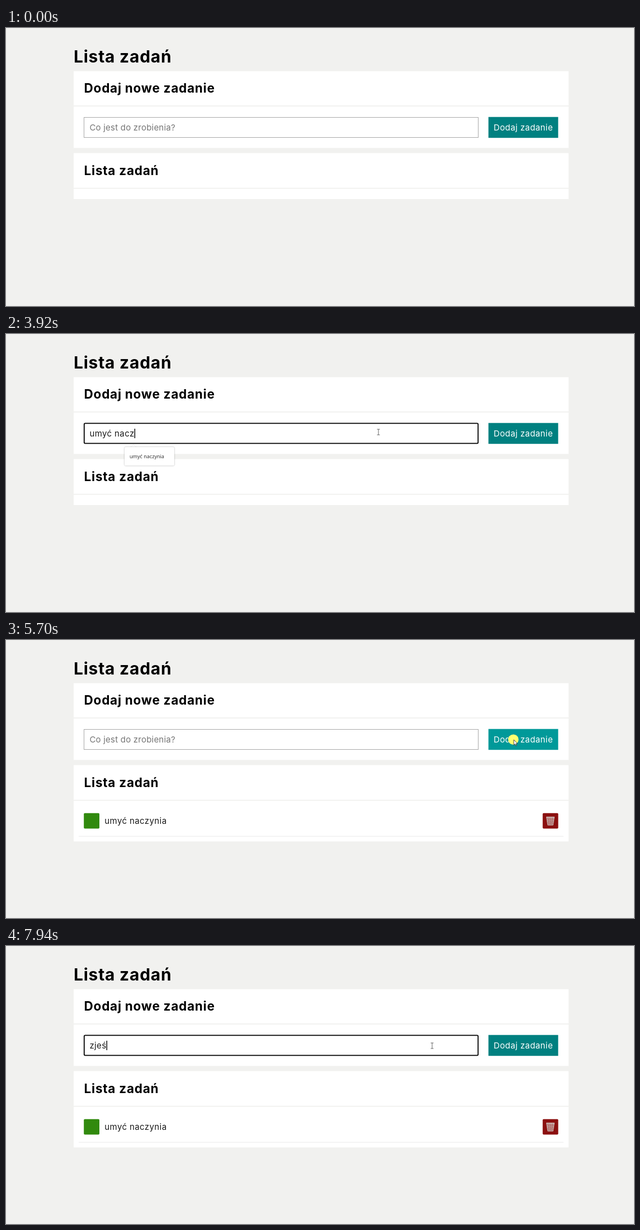
These frames come from a looping animation (1123x499 px, 8 s). An HTML page:

```html
<!DOCTYPE html>
<html lang="pl">
<head>
<meta charset="utf-8">
<title>Lista zadań</title>
<style>
  html, body { margin: 0; width: 100%; height: 100%; overflow: hidden; background: #f1f1ef; }
  svg { display: block; width: 100%; height: 100%; }
  text { font-family: Inter, "Open Sans", sans-serif; white-space: pre; }
  .h1 { font-size: 29.9px; font-weight: 700; letter-spacing: .8px; }
  .h2 { font-size: 22.5px; font-weight: 700; letter-spacing: .75px; }
  .body { font-size: 15px; letter-spacing: .4px; }
  .dark { fill: #1a1a1a; }
  .hint { fill: #757575; letter-spacing: .22px; }
  .item { font: 9px "Noto Sans", "Open Sans", sans-serif; fill: #333; }
  #popBox { fill: #fff; filter: drop-shadow(0 .5px 1px rgba(0, 0, 0, .35)); }
</style>
</head>
<body>
<svg viewBox="0 0 1123 499">
  <defs>
    <pattern id="mesh" width="3.2" height="3.2" patternUnits="userSpaceOnUse">
      <path d="M0 0L3.2 3.2M3.2 0L0 3.2" stroke="#d8d2ce" stroke-width=".9"/>
    </pattern>
  </defs>
  <rect width="1123" height="499" fill="#f1f1ef"/>
  <text class="h1" x="121" y="62">Lista zadań</text>

  <rect x="121" y="77.5" width="885" height="137.8" fill="#fff"/>
  <rect x="121" y="139" width="885" height="1.8" fill="#f1f1ef"/>
  <text class="h2" x="139.6" y="116.3">Dodaj nowe zadanie</text>

  <rect id="field" fill="#fff"/>
  <text id="hint" class="body hint" x="149.4" y="183.6">Co jest do zrobienia?</text>
  <text id="typed" class="body dark" x="149.4" y="183.6"></text>
  <rect id="caret" y="170" width="1.4" height="17"/>
  <rect id="button" x="862.7" y="159.7" width="124.7" height="37.5"/>
  <text class="body" x="872" y="183.6" fill="#fff">Dodaj zadanie</text>

  <rect id="list" x="121" y="224.6" width="885" fill="#fff"/>
  <rect x="121" y="286.8" width="885" height="1.8" fill="#f1f1ef"/>
  <text class="h2" x="139.6" y="263.8">Lista zadań</text>

  <g id="task">
    <rect x="139.2" y="310.7" width="27.8" height="27.8" rx="1.8" fill="#318a0e"/>
    <text class="body dark" x="176.3" y="329.8">umyć naczynia</text>
    <rect x="959.7" y="310.7" width="27.8" height="27.8" rx="1.8" fill="#8b1010"/>
    <path d="M966.5 318H980.5L978.2 332.3H968.8Z" fill="url(#mesh)" stroke="#c9c2bd" stroke-width=".9"/>
    <path d="M966 318H981" stroke="#d6d0cc" stroke-width="1.1"/>
    <rect x="130" y="351.8" width="867" height="1" fill="#ececec"/>
  </g>

  <g id="popup">
    <path d="M222.5 203.5L228 198.5L233.5 203.5" fill="#fff" stroke="#e8e8e8" stroke-width=".7"/>
    <rect id="popBox" x="212" y="203" rx="2"/>
    <g id="items"></g>
  </g>

  <circle id="glow" r="9.3" fill="#ffff70"/>
  <path id="beam" d="M-2.5 -5H2.5M0 -5V5M-2.5 5H2.5" fill="none" stroke="#555" stroke-width=".9"/>
  <path id="arrow" d="M0 0V9.6L2.2 7.6L3.8 11L5.3 10.4L3.8 7.1L6.6 6.9Z" fill="#fff" stroke="#222" stroke-width=".8"/>
</svg>
<script>
const LOOP = 8000, CLICK = 75, BLINK = 530;
const FOCUS = 1200, SUBMIT = 5630, ADDED = 5700, REFOCUS = 6440;

// Key points of the pointer: time, x, y
const path = [
  [330, 684, 8], [860, 666, 176], [4810, 666, 176], [4950, 777, 254],
  [5080, 777, 254], [5560, 908, 179], [5900, 908, 179], [6240, 762, 179]
];
const bursts = [
  { start: 2190, pace: 230, text: 'umy' },
  { start: 3120, pace: 140, text: 'ć naczynia' },
  { start: 7190, pace: 250, text: 'zjeś' }
];
const history = ['umyć naczynia', 'zapłacić rachunki', 'odkurzyć pokój',
  'wyrzucić stare gazety', 'podlać kwiaty', 'nakarmić kota'];

const el = id => document.getElementById(id);
const attr = (node, values) => {
  for (const k in values) node.setAttribute(k, values[k]);
};
const show = (id, on) => attr(el(id), { visibility: on ? 'visible' : 'hidden' });
const setText = (node, text) => {
  if (node.textContent !== text) node.textContent = text;
};
const smooth = p => p * p * (3 - 2 * p);

function pointerAt(t) {
  const i = path.findIndex(([time]) => time > t);
  if (i === 0) return null;
  if (i < 0) return path[path.length - 1].slice(1);
  const [t0, x0, y0] = path[i - 1], [t1, x1, y1] = path[i];
  const p = smooth((t - t0) / (t1 - t0));
  return [x0 + (x1 - x0) * p, y0 + (y1 - y0) * p];
}

// Text in the field, and the time of the last click or key
function inputAt(t) {
  const since = t < ADDED ? 0 : ADDED;
  let text = '', last = t < REFOCUS ? FOCUS : REFOCUS;
  for (const { start, pace, text: part } of bursts) {
    if (start < since || start > t) continue;
    const count = Math.min(part.length, Math.floor((t - start) / pace) + 1);
    text += part.slice(0, count);
    last = start + (count - 1) * pace;
  }
  return { text, last };
}

function drawField(text, focus, caretOn) {
  attr(el('field'), focus
    ? { x: 139.8, y: 160.4, width: 704.4, height: 36, rx: 1.8, stroke: '#000', 'stroke-width': 1.8 }
    : { x: 139.5, y: 160.5, width: 705, height: 36, rx: 0, stroke: '#a9a9a9', 'stroke-width': 1 });
  setText(el('typed'), text);
  show('hint', !text);
  show('caret', caretOn);
  attr(el('caret'), { x: 149.4 + (text ? el('typed').getComputedTextLength() : 0) });
}

let listed = '';
function drawPopup(names) {
  show('popup', names.length > 0);
  const key = names.join();
  if (key === listed) return;
  listed = key;
  el('items').innerHTML = names
    .map((s, i) => `<text class="item" x="221" y="${223 + 26.8 * i}">${s}</text>`).join('');
  const widths = [...el('items').children].map(n => n.getComputedTextLength());
  attr(el('popBox'), { width: 27 + Math.max(0, ...widths), height: 6.4 + 26.8 * names.length });
}

function drawPointer(t) {
  const pos = pointerAt(t);
  const [x, y] = pos || [0, 0];
  const inRow = y > 160 && y < 197;
  const inField = inRow && x > 139 && x < 845;
  const onButton = inRow && x > 863 && x < 987;
  for (const id of ['beam', 'arrow']) attr(el(id), { transform: `translate(${x} ${y})` });
  attr(el('glow'), { cx: x - .7, cy: y - .3 });
  show('beam', inField);
  show('arrow', pos && !inField);
  show('glow', [FOCUS, SUBMIT, REFOCUS].some(c => t >= c && t < c + CLICK));
  attr(el('button'), { fill: onButton ? '#009999' : '#008080' });
}

function draw(t) {
  const done = t >= ADDED;
  show('task', done);
  attr(el('list'), { height: done ? 136.9 : 82.4 });

  const { text, last } = inputAt(t);
  const focus = (t >= FOCUS && t < SUBMIT) || t >= REFOCUS;
  drawField(text, focus, focus && (t - last) % (2 * BLINK) < BLINK);

  const open = focus && t >= (t < REFOCUS ? FOCUS : REFOCUS) + CLICK;
  drawPopup(open ? history.filter(s => s.startsWith(text) && s !== text) : []);
  drawPointer(t);
}

const start = performance.now();
function tick() {
  draw((performance.now() - start) % LOOP);
  requestAnimationFrame(tick);
}
tick();
</script>
</body>
</html>
```
